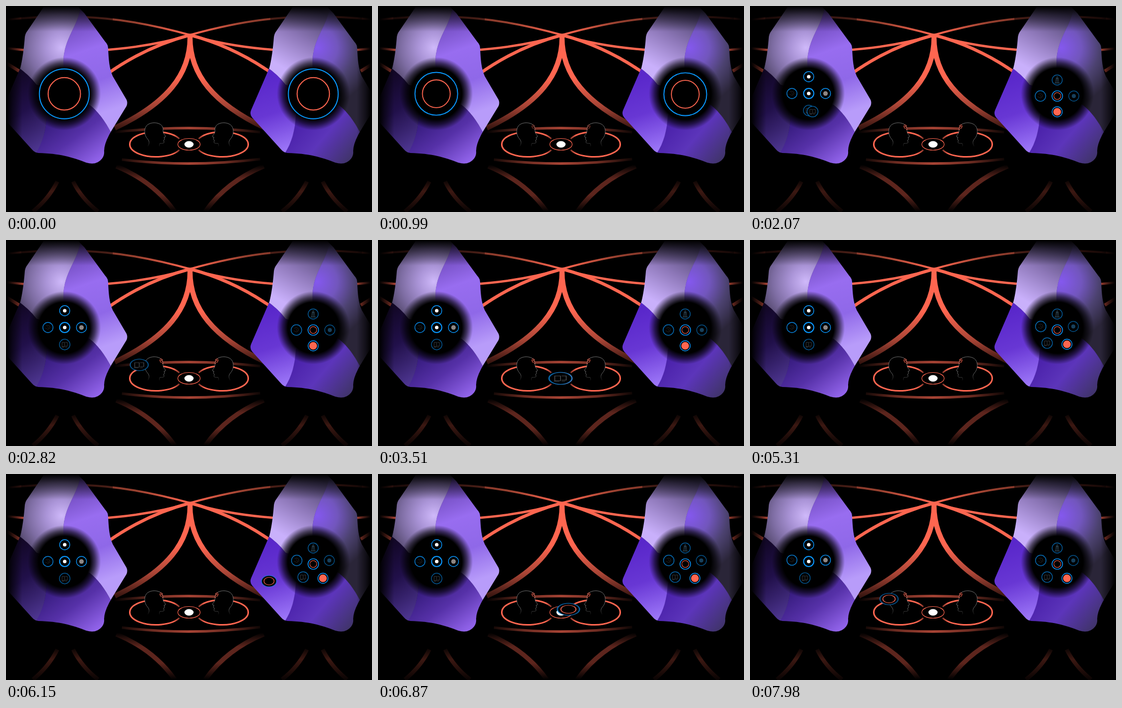
Animation, 720 px wide and 405 px high, one loop 8 s. Source, as an HTML page with a canvas:

```html
<!DOCTYPE html>
<html lang="en">
<head>
<meta charset="utf-8">
<title>Two minds exchanging tokens</title>
<style>
html, body { margin: 0; width: 100%; height: 100%; overflow: hidden; background: #000; }
svg, canvas { position: absolute; left: 0; top: 0; width: 720px; height: 405px; }
</style>
</head>
<body>
<svg viewBox="0 0 720 405" fill="none">
  <defs id="defs">
    <clipPath id="shape">
      <path d="M74 2 L42 49 Q38 54 37 61 Q34 99 28 122 L-8 205 Q-11 213 -6 219 L51 282 Q56 288 64 289 C105 290 130 297 158 308 Q178 314 189 300 Q194 293 193 285 Q193 270 207 246 L237 197 Q240 190 237 184 L210 138 C203 122 202 105 201 84 Q201 76 195 70 L154 14 L142 2Z"/>
    </clipPath>
    <radialGradient id="hole">
      <stop offset=".7"/><stop offset=".84" stop-opacity=".6"/><stop offset="1" stop-opacity="0"/>
    </radialGradient>
  </defs>
  <g id="web"></g>
  <g id="blobs"></g>
  <g id="people"></g>
</svg>
<canvas width="720" height="405"></canvas>
<script>
const CORAL = '#ff6650', BLUE = '#0a98ff', TAU = Math.PI * 2;
const $ = id => document.getElementById(id);
const mirror = (id, width) => `<use href="#${id}" transform="translate(${width} 0) scale(-1 1)"/>`;

// Each helper adds a gradient in stage units and returns a paint reference.
let gradients = 0;
function gradient(kind, geometry, stops) {
  const id = 'g' + gradients++;
  $('defs').insertAdjacentHTML('beforeend',
    `<${kind}Gradient id="${id}" gradientUnits="userSpaceOnUse" ${geometry}>` +
    stops.map(([at, color]) => `<stop offset="${at}" stop-color="${color}"/>`).join('') + `</${kind}Gradient>`);
  return `url(#${id})`;
}
const linear = (x1, y1, x2, y2, ...stops) =>
  gradient('linear', `x1="${x1}" y1="${y1}" x2="${x2}" y2="${y2}"`, stops);
const radial = (cx, cy, r, ...stops) => gradient('radial', `cx="${cx}" cy="${cy}" r="${r}"`, stops);
const stroke = (d, paint, width) => `<path d="${d}" stroke="${paint}" stroke-width="${width}"/>`;

// Coral web
const topFade = linear(0, 0, 362, 0, [0, '#190907'], [.3, '#67281f'], [.7, '#96402f'], [1, CORAL]);
const sideFade = linear(0, 0, 362, 0, [0, '#4a1b14'], [.12, '#b74939'], [.52, CORAL], [1, CORAL]);
const dropFade = linear(0, 57, 0, 242, [0, CORAL], [.45, CORAL], [.75, '#a94536'], [1, '#35140f']);
const bandFade = linear(212, 0, 510, 0, [0, '#000'], [.25, '#6b2b21'], [.5, '#a84435'], [.75, '#6b2b21'], [1, '#000']);
const footFade = linear(0, 312, 0, 404, [0, '#000'], [.3, '#5d251d'], [.65, '#5d251d'], [1, '#000']);
const lowFade = linear(0, 338, 0, 404, [0, '#000'], [.4, '#3c1812'], [1, '#0a0403']);
$('web').innerHTML = `<g id="webHalf">` +
  stroke('M0 27 C150 11 255 27 362 57', topFade, 4) +
  stroke('M0 83 C110 96 255 90 362 57', sideFade, 4.5) +
  stroke('M0 112 L26 128 M362 57 Q275 80 200 133', sideFade, 6.2) +
  stroke('M362 57 C364 135 315 192 214 240', dropFade, 10) +
  stroke('M217 315 Q290 345 332 404', footFade, 9) +
  stroke('M101 345 Q84 379 53 404 M132 345 Q149 379 181 404', lowFade, 8) +
  '</g>' + mirror('webHalf', 724) +
  stroke('M213 248 Q360 232 500 248', bandFade, 5) +
  stroke('M228 302 Q360 318 500 301', bandFade, 5);

// Purple blobs: top-left, right, bottom and left facets
const FACETS = [
  'M147 0 C143 40 114 62 113 110 V172 L60 155 Q45 135 20 118 V0Z',
  'M147 0 C143 40 114 62 113 110 V172 L165 195 Q188 213 207 250 H250 V0Z',
  'M115 172 L165 195 Q188 213 207 250 V320 H58 V288 Q78 260 80 215Z',
  'M20 118 Q45 135 60 155 L115 172 L80 215 Q78 260 58 290 H-20 V118Z'
];
const blob = (dx, paints) => `<g transform="translate(${dx} 0)"><g clip-path="url(#shape)">` +
  FACETS.map((d, i) => `<path d="${d}" fill="${paints[i]}" stroke="${paints[i]}" stroke-width=".5"/>`).join('') +
  `</g><circle cx="114.7" cy="172.5" r="72" fill="url(#hole)"/></g>`;

// Black shade that clears from (x1, y1) to (x2, y2) over a w by h box
function shade(x, y, w, h, x1, y1, x2, y2) {
  const paint = linear(x1, y1, x2, y2, [0, '#000'], [.35, '#0009'], [1, '#0000']);
  return `<path d="M${x} ${y}h${w}v${h}h${-w}Z" fill="${paint}"/>`;
}
$('blobs').innerHTML =
  blob(0, [
    radial(110, 82, 100, [0, '#cfb9fa'], [.3, '#ab95d8'], [.65, '#7e6da3'], [1, '#4b4162']),
    linear(150, 0, 220, 200, [0, '#6a48b0'], [.2, '#7c55cc'], [.4, '#986df0'], [.7, '#8f68e8'], [1, '#b89cfa']),
    linear(110, 200, 185, 300, [0, '#33197a'], [.5, '#5631a8'], [1, '#9163ea']),
    linear(0, 150, 80, 275, [0, '#120726'], [.45, '#21104a'], [1, '#4f3793'])
  ]) +
  blob(490, [
    linear(115, 2, 50, 118, [0, '#4a4068'], [.5, '#8d77b8'], [1, '#c9b0fb']),
    radial(122, 82, 115, [0, '#8458ee'], [.35, '#7256bd'], [.65, '#4c4270'], [1, '#2a2538']),
    linear(95, 220, 190, 300, [0, '#4b22ab'], [.45, '#5c35ba'], [1, '#40346a']),
    linear(10, 140, 55, 285, [0, '#5927ca'], [.5, '#6837d4'], [1, '#9c76f8'])
  ]) +
  shade(30, 0, 180, 50, 0, 0, 0, 50) + shade(520, 0, 180, 50, 0, 0, 0, 50) +
  shade(0, 0, 32, 405, 2, 0, 32, 0) + shade(690, 0, 30, 405, 718, 0, 690, 0);

// Heads and their rings
const skin = linear(0, 230, 0, 276, [0, '#8a8a8a'], [.75, '#777'], [1, '#111']);
const ringFade = linear(330, 0, 342, 0, [0, CORAL], [1, '#7a3126']);
const PROFILE = 'M279 276 Q284 268 279 262 C272 255 271 243 276 236 C283 227 302 228 307 236 Q310 240 309 247 Q309 250 314 256 Q314 258 311 258 L312 262 310 264 311 268 Q310 271 303 270 Q301 272 302 276';
$('people').innerHTML = `<g id="person">` +
  stroke('M341 261 A51.5 24.5 0 1 0 341 283', ringFade, 3) +
  `<path d="${PROFILE}" fill="#000" stroke="${skin}" stroke-width=".8"/></g>` + mirror('person', 720) +
  `<ellipse cx="360" cy="272" rx="22" ry="11.5" fill="#000" stroke="${CORAL}" stroke-width="1.2"/>
   <ellipse cx="360" cy="272" rx="9" ry="6.5" fill="#fff"/>`;

// Moving parts
const ctx = document.querySelector('canvas').getContext('2d');
const mix = (a, b, p) => a + (b - a) * p;
const ease = (t, start, duration) => {
  const u = Math.min(1, Math.max(0, (t - start) / duration));
  return u * u * (3 - 2 * u);
};
function ring(x, y, r, color, width) {
  ctx.beginPath();
  ctx.arc(x, y, r, 0, TAU);
  ctx.strokeStyle = color;
  ctx.lineWidth = width;
  ctx.stroke();
}
function disc(x, y, r, color) {
  ctx.beginPath();
  ctx.arc(x, y, r, 0, TAU);
  ctx.fillStyle = color;
  ctx.fill();
}
function lines(d, color, width = .7) {
  ctx.strokeStyle = color;
  ctx.lineWidth = width;
  ctx.stroke(new Path2D(d));
}

const ICONS = {
  white() { disc(0, 0, 3.5, '#fff'); },
  grey() { disc(0, 0, 4.5, '#8d8785'); },
  coral() { disc(0, 0, 7.6, CORAL); },
  steel() { disc(0, 0, 4, '#17405c'); },
  agent() { ring(0, 0, 6.8, '#d65a48', 1); },
  faint() { lines('M-4 -3Q0 -6 3 -3L4 1Q1 5 -2 3L-5 1M-1 -2L2 2', '#353535'); },
  tower() { lines('M-5 6H5M-3 6L-2 -3L0 -7L2 -3L3 6M-2 -3H2M0 -3V6', '#4b7288'); },
  pair() { lines('M-5 -4H0V4H-5ZM1 -4H5V3H1M-6 5H-1M1 5H4', '#484c50'); }
};
function token(icon, x, y, alpha = 1, bright = 1, rx = 10, ry = 10, width = 1.4) {
  if (!alpha) return;
  ctx.save();
  ctx.translate(x, y);
  ctx.scale(rx / 10, ry / 10);
  ctx.globalAlpha = alpha;
  disc(0, 0, 10, '#000');
  ICONS[icon]();
  ctx.globalAlpha = alpha * bright;
  ring(0, 0, 10, BLUE, width);
  ctx.restore();
}
// Large emblem that shrinks into the hub's middle token
function emblem(x, y, r, alpha) {
  ctx.globalAlpha = alpha;
  disc(x, y, r, '#000');
  ring(x, y, r, BLUE, mix(1.3, 2, r / 49));
  ring(x, y, r * .65, CORAL, mix(.8, 2, r / 49));
  ctx.globalAlpha = 1;
}
function traveller(icon, from, to, p, flatFrom, flatTo) {
  const flat = mix(flatFrom, flatTo, p);
  token(icon, mix(from[0], to[0], p), mix(from[1], to[1], p), 1,
    .65 - .15 * Math.sin(Math.PI * p), mix(10.4, 22.5, flat), mix(10.4, 11.8, flat), 1.3);
}

const MIDDLE = [359, 272];
const LEG = 1620;

function draw(t) {
  ctx.clearRect(0, 0, 720, 405);
  const shrink = ease(t, 600, 1450);
  const leftIn = ease(t, 1000, 950), rightIn = ease(t, 800, 850);
  const leaveLeft = ease(t, 1900, LEG), reachRight = ease(t, 3690, LEG);
  const leaveRight = ease(t, 5500, LEG), reachLeft = ease(t, 7300, LEG);

  // Sparks inside the heads
  ctx.globalAlpha = ease(t, 400, 1100);
  const spark = 'M303 234Q307 233 308 236M304 237Q308 236 308 240M303 235Q302 239 306 241M307 241Q309 242 308 244';
  lines(spark, CORAL, 1.1);
  ctx.save();
  ctx.translate(720, 0);
  ctx.scale(-1, 1);
  lines(spark, CORAL, 1.1);
  ctx.restore();

  // Left hub
  emblem(114.7, mix(172.7, 172, shrink), mix(49, 10, shrink), 1 - leftIn);
  const leftSide = mix(172, 165, reachLeft);
  token('white', 115.5, 139, leftIn);
  token('faint', 82.5, leftSide, leftIn, .85);
  token('grey', 148.5, leftSide, leftIn, .95);
  token('white', 115.5, 172, leftIn, 1, 10, 10, 2);
  token('pair', mix(115.5, 96, reachLeft), mix(205.5, 203, reachLeft), leftIn, .55, 10.4, 10.4);

  // Right hub
  const rightSide = mix(177, 170, reachRight);
  const dim = .7 - .25 * Math.sin(Math.PI * reachRight);
  token('tower', 604.3, 145.5, rightIn, .6);
  token('faint', mix(571.3, 572, reachRight), rightSide, rightIn, dim, 10.4, 10.4);
  token('steel', mix(637, 636, reachRight), rightSide, rightIn, dim * .75);
  token('coral', mix(604.3, 623.5, reachRight), mix(208, 205, reachRight), rightIn, .95);
  emblem(604.5, mix(172.7, 177, shrink), mix(49, 10.4, shrink), 1);

  // Tokens in flight
  if (t > 1900 && t < 3690) traveller('pair', [115.5, 205.5], MIDDLE, leaveLeft, 0, 1);
  if (t >= 3690) traveller('pair', MIDDLE, [584.5, 202.7], reachRight, 1, 0);
  if (t > 5500 && t < 7300) traveller('agent', [604.5, 177], MIDDLE, leaveRight, 0, 1);
  if (t >= 7300) traveller('agent', MIDDLE, [135, 203], reachLeft, 1, 0);
}

function frame() {
  draw(performance.now() % 8000);
  requestAnimationFrame(frame);
}
frame();
</script>
</body>
</html>
```
